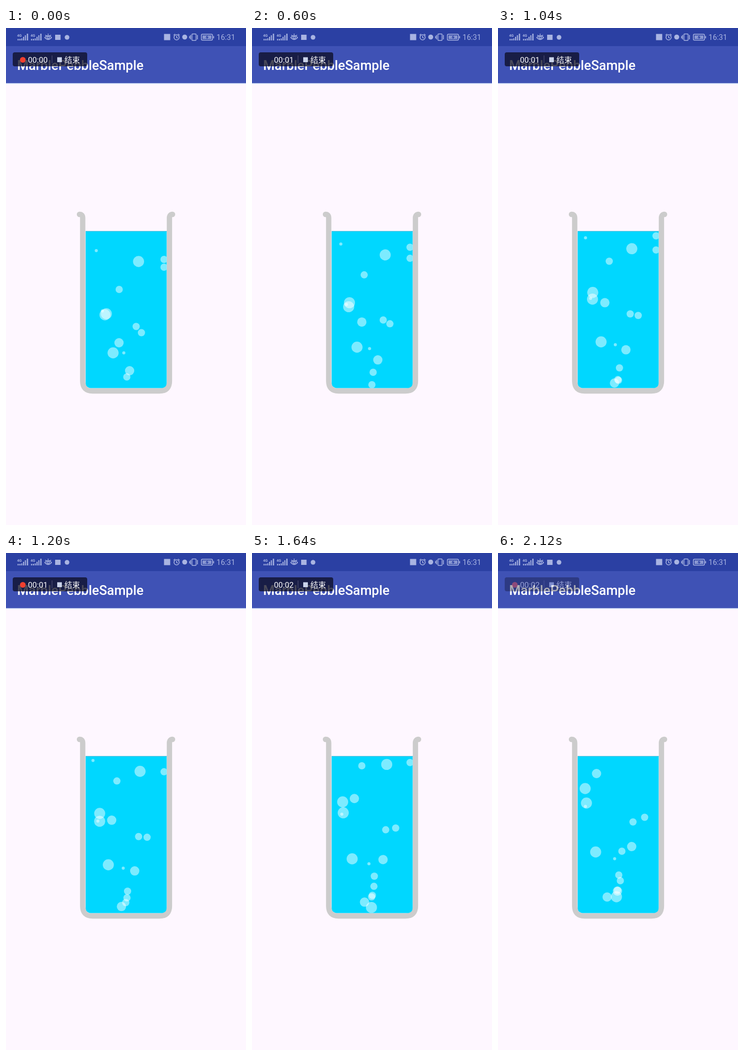
An HTML page for the animation above (2160 ms loop, 464 by 960 pixels).

```html
<!DOCTYPE html>
<html lang="zh">
<head>
<meta charset="utf-8">
<title>Beaker</title>
<style>
  html, body { margin: 0; width: 100%; height: 100%; overflow: hidden; background: #fef7ff; }
  svg { display: block; width: 464px; height: 960px; }
  text { font-family: Roboto, "Noto Sans CJK SC", "Noto Sans CJK", sans-serif; }
</style>
</head>
<body>
<svg viewBox="0 0 464 960">
  <defs>
    <clipPath id="inside">
      <path d="M154 392H310.6V685Q310.6 695.6 299 695.6H166Q154 695.6 154 685Z"/>
    </clipPath>
    <g id="signal" fill="#a9b4e2">
      <text y="16.5" font-size="7" font-weight="700">4G</text>
      <path d="M1 21h2v3h-2zM4.5 21h2v3h-2zM8 20h2v4h-2zM11.5 17h2v7h-2zM15 14h2v10h-2zM18.8 11h2.4v13h-2.4z"/>
    </g>
  </defs>

  <rect width="464" height="960" fill="#fef7ff"/>
  <rect y="106" width="464" height="3" fill="#e9f0ff"/>
  <rect y="34" width="464" height="72.6" fill="#3f52b5"/>
  <rect width="464" height="35" fill="#2b40a3"/>

  <!-- status bar -->
  <use href="#signal" x="21.5"/>
  <use href="#signal" x="47.5"/>
  <g fill="none" stroke="#a9b4e2" stroke-width="1.5">
    <path d="M75 18.5Q81.5 10.5 88 18.5Q81.5 26 75 18.5ZM76 13.5L78 15.5M87 13.5L85 15.5M81.5 11V13"/>
    <circle cx="81.5" cy="18.5" r="2.2"/>
    <circle cx="329.8" cy="18" r="5"/>
    <path d="M329.8 15V18.3L332 19.5M324 14L327 11.5M335.6 14L332.6 11.5"/>
    <rect x="359.5" y="11.5" width="8" height="12.5" rx="1"/>
    <path d="M356.8 13.5V22M354.8 15.5V20M370.2 13.5V22"/>
    <rect x="377.7" y="12" width="21.5" height="11.5" rx="2"/>
  </g>
  <g fill="#a9b4e2">
    <rect x="95" y="13" width="10.5" height="10"/>
    <circle cx="118" cy="18" r="4.5"/>
    <rect x="305.5" y="11.5" width="12" height="12"/>
    <circle cx="345.5" cy="17.5" r="4.8"/>
    <rect x="380" y="14.3" width="17" height="7" opacity=".75"/>
    <rect x="400.5" y="15.5" width="1.7" height="4.5"/>
    <text x="407" y="23" font-size="14.5">16:31</text>
  </g>
  <path d="M390 13.5L385.5 18.5H388.5L387.5 22L392 17H389Z" fill="#2b40a3"/>

  <text x="21.5" y="80.5" font-size="25.5" font-weight="500" fill="#fff">MarblePebbleSample</text>

  <!-- recorder pill -->
  <g id="pill">
    <rect x="13" y="47" width="144" height="27" rx="4" fill="#0b0c20" opacity=".74"/>
    <circle id="dot" cx="32.5" cy="61.5" r="5.5" fill="#f04030"/>
    <text id="clock" x="42.5" y="66.5" font-size="15.3" fill="#fff">00:00</text>
    <rect x="88.5" y="53" width="1" height="15" fill="#56597a"/>
    <rect x="99" y="56.5" width="9" height="9.5" fill="#c9d2ea"/>
    <text x="113" y="66.5" font-size="15" fill="#fff">结束</text>
  </g>

  <!-- beaker -->
  <path d="M142 360Q148.3 360 148.3 367V682Q148.3 701 167 701H297Q316 701 316 682V367Q316 360 322 360"
        fill="none" stroke="#ccc" stroke-width="10.3" stroke-linecap="round"/>
  <g clip-path="url(#inside)">
    <rect x="150" y="392" width="165" height="308" fill="#00d7ff"/>
    <rect x="150" y="392" width="165" height="1.3" fill="#55c4e0"/>
    <g id="bubbles" fill="#fff" fill-opacity=".49"></g>
  </g>
</svg>
<script>
const LOOP = 2160, STEP = 40;
const SURFACE = 392, FLOOR = 697, LEFT = 159, RIGHT = 305.5;
const NOZZLE = { x: 232, y: 696 };
const byId = id => document.getElementById(id);

// Bubbles by radius: where each ends up (x, y) and how far it rises in a loop.
// Ends above the surface belong to bubbles that burst on the way.
const SIZES = [
  [3, [[162, 372, 58], [169, 489.5, 57], [225.5, 590.5, 37]]],
  [7, [[210, 377, 128], [338, 340, 107], [331, 384, 78], [261, 519.5, 57], [283.5, 510.5, 78],
       [236.5, 633, 41], [231, 651.5, 48], [239.5, 576, 182], [233.5, 622, 148]]],
  [9, [[190.5, 426, 182], [258.5, 567, 95], [211, 664.5, 37], [231, 653, 136]]],
  [10.7, [[262, 393, 58], [168.5, 455, 97], [171, 483, 71], [188.8, 577.5, 50], [229, 664, 78]]]
];

const clamp = (v, low, high) => Math.max(low, Math.min(high, v));
const show = (el, on) => el.setAttribute("visibility", on ? "visible" : "hidden");

function makeBubble(r, [x, y, rise]) {
  const el = document.createElementNS("http://www.w3.org/2000/svg", "circle");
  el.setAttribute("r", r);
  byId("bubbles").append(el);
  const slope = (x - NOZZLE.x) / (NOZZLE.y - y);
  return { el, r, y, rise, slope };
}

const bubbles = SIZES.flatMap(([r, ends]) => ends.map(end => makeBubble(r, end)));

// Each bubble rises on a straight line from the nozzle and slides up the wall it meets.
function moveBubble({ el, r, y, rise, slope }, progress) {
  const cy = y + rise * (1 - progress);
  const cx = NOZZLE.x + slope * (NOZZLE.y - cy);
  el.setAttribute("cx", clamp(cx, LEFT, RIGHT));
  el.setAttribute("cy", cy);
  show(el, cy - r >= SURFACE && cy + r <= FLOOR);
}

function draw(t) {
  const progress = (t / (LOOP - STEP)) ** 1.2;
  bubbles.forEach(b => moveBubble(b, progress));

  const clock = t + 440;
  byId("clock").textContent = "00:0" + Math.floor(clock / 1000);
  show(byId("dot"), t < 560 || clock % 1000 >= 500);
  byId("pill").setAttribute("opacity", Math.min(1, (2200 - t) / 180));
}

const start = performance.now();
function frame() {
  const t = (performance.now() - start) % LOOP;
  draw(Math.floor(t / STEP) * STEP);
  requestAnimationFrame(frame);
}
frame();
</script>
</body>
</html>
```
